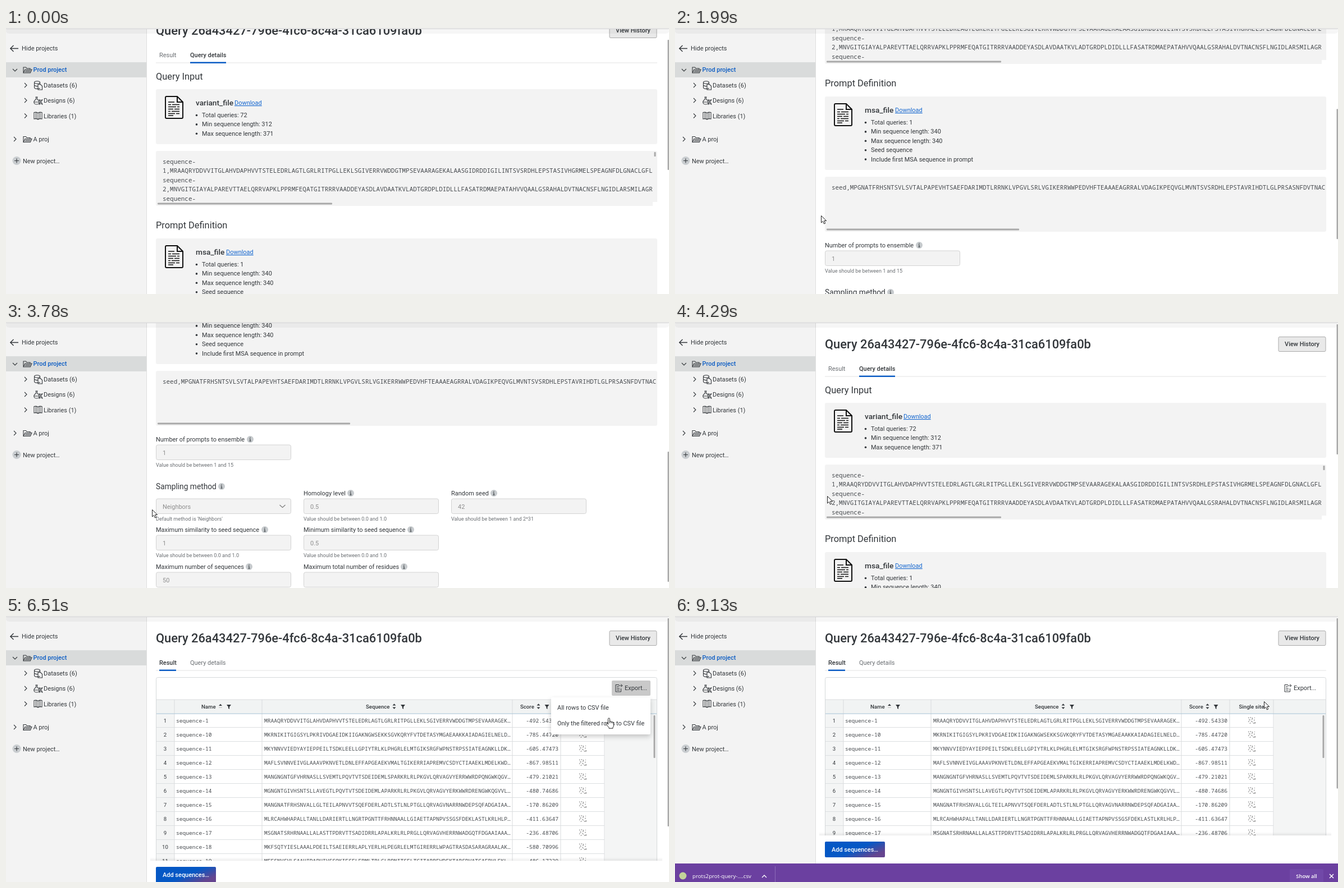
Write an HTML page that moves like this. It is 1181x474 px and loops after 9.15 s.

```html
<!DOCTYPE html>
<html lang="en">
<head>
<meta charset="utf-8">
<title>Query details</title>
<style>
  html, body { margin: 0; width: 100%; height: 100%; overflow: hidden; background: #fff; }
  svg { display: block; width: 100vw; height: 100vh; font: 10.94px Roboto, sans-serif; }
  text { fill: #33373b; white-space: pre; }
  .mono { font-family: "Noto Sans Mono", monospace; fill: #484c50; }
  .link { fill: #1567cf; text-decoration: underline; text-underline-offset: 2px; }
  .line { fill: none; stroke: #33373b; stroke-width: 1.1; }
</style>
</head>
<body>
<svg id="stage" viewBox="0 0 1181 474"></svg>
<script>
const LOOP = 9150;
const GREY = '#f3f3f3', THUMB = '#a9a9a9', BLUE = '#0b5cc4';

// ---- markup helpers ----
const text = (x, y, str, attrs = '') => `<text x="${x}" y="${y}" ${attrs}>${str}</text>`;
const bold = (size, extra = '') => `font-weight="500" font-size="${size}" ${extra}`;
const box = (x, y, w, h, fill, attrs = '') =>
  `<rect x="${x}" y="${y}" width="${w}" height="${h}" fill="${fill}" ${attrs}/>`;
const path = (d, attrs = 'class="line"') => `<path d="${d}" ${attrs}/>`;
const group = (id, body, attrs = '') => `<g id="${id}" ${attrs}>${body}</g>`;
const use = (id, x, y) => `<use href="#${id}" x="${x}" y="${y}"/>`;
const chevron = (x, y) => path(`M${x - 2} ${y - 4}l4 4l-4 4`);

const defs = `<defs>
  <linearGradient id="buttonFill" x2="1" y2=".6"><stop offset=".6" stop-color="#0558c5"/><stop offset="1" stop-color="#65458f"/></linearGradient>
  <linearGradient id="fade" x2="0" y2="1"><stop stop-color="#000" stop-opacity="0"/><stop offset="1" stop-color="#000" stop-opacity=".07"/></linearGradient>
  <filter id="shadow" x="-10%" y="-15%" width="120%" height="150%"><feDropShadow dx="0" dy="4" stdDeviation="4" flood-opacity=".2"/></filter>
  <clipPath id="variantClip">${box(267, 254, 885, 91, '#000')}</clipPath>
  <clipPath id="seedClip">${box(267, 553, 892, 98, '#000')}</clipPath>
  <g id="folder">${path('M0 11V1h4.5l1.5 2h6v2M0 11L3 5h12l-2.7 6ZM3.5 7h9.5M2.5 9h9.5')}</g>
  <g id="file" fill="none" stroke="#111" stroke-width="2">
    <path d="M1 3q0-2 2-2h19l10 10v27q0 2-2 2H3q-2 0-2-2ZM22 1v10h10"/>
    <path stroke-width="1.6" d="M6 11h11M6 15.500h5m2 0h13M6 19.500h14m2 0h4M6 23.500h9m2 0h9M6 27.500h4m2 0h14M6 31.500h12m2 0h6M6 35h9"/>
  </g>
  <g id="info"><circle r="6" fill="#c6cacd"/><path d="M0-1v4.200M-1.300-1H0M-1.500 3.200h3M0-3.700v1.400" stroke="#43484c" stroke-width="1.200"/></g>
  <g id="sort"><path d="M-3-1.500L0-4.800L3-1.500Z" fill="#33373b"/><path d="M-3 1.500L0 4.800L3 1.500Z" fill="#33373b"/></g>
  <g id="sortUp"><path d="M-3-1L0-4.300L3-1Z" fill="#33373b"/><path d="M-3 2h6" stroke="#bbb"/></g>
  <g id="funnel"><path d="M-4-3.500h8L1 .5v4L-1 3V.5Z" fill="#33373b"/></g>
  <g id="site"><path d="M-6-5l2 1m2-2l1 2m3-1l-1 2m4-2l1 1M-5-1l3 0m2 0l2-2m2 3l2-1M-6 3l2-2m1 5l1-2m2-2l2 1m1 3l1-2m2-1l1 2M-1 1l1 1M5 4l1 2" stroke="#666" stroke-width=".9" fill="none"/></g>
</defs>`;

// ---- sidebar ----
const treeRow = (y, label) => chevron(35, y) + text(67, y + 4, label);
const sidebar = box(0, 0, 250, 474, GREY) + box(250, 0, 1, 474, '#dedede') +
  box(0, 61, 250, 27, '#d9dbdb') +
  path('M22 36.500H8M13.500 31l-5.700 5.500l5.700 5.500', 'class="line" style="stroke-width:1.4"') +
  text(28, 40, 'Hide projects') +
  path('M12 73l4 4l4-4') + use('folder', 31, 69) +
  text(48.500, 78, 'Prod project', bold(10.94, `style="fill:${BLUE}"`)) +
  treeRow(102, 'Datasets (6)') +
  path('M50.500 97v9c0 3 9 3 10 1M50.500 97c0-3 10-3 10 0s-10 3-10 0m0 4.500c0 2 5 2.500 7 1.800M60.500 97v3M57 100.500h4.500l3 3v6.500h-7.500Z') +
  treeRow(129, 'Designs (6)') +
  path('M52.500 123h4M53.500 123v4c-6 4-4 9 1 9s7-5 1-9v-4M50.500 132h8M59 127c0 4 6 5 6 10M65 127c0 4-6 5-6 10M59.500 128.500h5M60 135h5') +
  treeRow(156.500, 'Libraries (1)') +
  path('M50 150.500q4-1 7 1q3-2 7-1v11.500q-4-1-7 1q-3-2-7-1ZM57 151.500v11M60.500 150.500v11M53.500 150.500v11') +
  chevron(16, 198) + use('folder', 31, 192.500) + text(48.500, 202, 'A proj') +
  '<circle cx="19" cy="236.500" r="7.500" fill="#c9cdd0"/>' + path('M15 236.500h8M19 232.500v8') +
  text(30, 240.500, 'New project…');

// ---- shared page head ----
const head = text(267, 47, 'Query 26a43427-796e-4fc6-8c4a-31ca6109fa0b', bold(21.88)) +
  box(1075, 26.500, 84, 26, '#e9e9e9', 'rx="2" stroke="#aaa"') +
  text(1117, 43, 'View History', bold(10.94, 'text-anchor="middle"')) +
  box(267, 96.500, 893, 1, '#e3e3e3');
const tabs = active => [['Result', 273, 30], ['Query details', 328, 64]].map(([name, x, w], i) =>
  text(x, 87, name, i === active ? bold(10.94) : 'style="fill:#6a6e72"') +
  (i === active ? box(x, 95.500, w, 2.500, BLUE) : '')).join('');

// ---- details view ----
const heading = (y, str) => text(267, y, str, 'font-size="16.4"');
const fileCard = (y, h, name, linkX, facts) =>
  box(267, y, 893, h, GREY, 'rx="3"') + use('file', 283, y + 12) +
  text(338, y + 28.500, name, bold(13.7)) + text(linkX, y + 28, 'Download', 'class="link"') +
  facts.map((fact, i) => `<circle cx="339.500" cy="${y + 46.500 + i * 16.4}" r="1.800" fill="#33373b"/>` +
    text(349, y + 50 + i * 16.4, fact)).join('');
const field = (x, y, label, infoX, value, help) =>
  text(x, y + 4, label) + use('info', infoX, y) +
  box(x + .5, y + 10, 240, 26.500, GREY, 'rx="3" stroke="#d3d3d3"') +
  text(x + 12, y + 27.500, value, 'style="fill:#8d8d8d"') +
  text(x, y + 48.500, help, 'font-size="9.1" style="fill:#6a6e72"');
const unit = 'Value should be between 0.0 and 1.0';
const variantLines = [
  'sequence-',
  '1,MRAAQRYDDVVITGLAHVDAPHVVTSTELEDRLAGTLGRLRITPGLLEKLSGIVERRVWDDGTMPSEVAARAGEKALAASGIDRDDIGILINTSVSRDHLEPSTASIVHGRMELSPEAGNFDLGNACLGFL',
  'sequence-',
  '2,MNVGITGIAYALPAREVTTAELQRRVAPKLPPRMFEQATGITRRRVAADDEYASDLAVDAATKVLADTGRDPLDIDLLLFASATRDMAEPATAHVVQAALGSRAHALDVTNACNSFLNGIDLARSMILAGR',
  'sequence-'];
const seed = 'seed,MPGNATFRHSNTSVLSVTALPAPEVHTSAEFDARIMDTLRRNKLVPGVLSRLVGIKERRWWPEDVHFTEAAAEAGRRALVDAGIKPEQVGLMVNTSVSRDHLEPSTAVRIHDTLGLPRSASNFDVTNACLG';

const details = head + tabs(1) +
  heading(127, 'Query Input') +
  fileCard(144, 98, 'variant_file', 407, ['Total queries: 72', 'Min sequence length: 312', 'Max sequence length: 371']) +
  box(267, 254, 893, 98, GREY, 'rx="3"') + box(1152, 345, 8, 7, '#fff') +
  `<g clip-path="url(#variantClip)">${variantLines.map((line, i) =>
    text(279, 277 + i * 16.4, line, 'class="mono"')).join('')}</g>` +
  box(270, 346.500, 311, 3, THUMB, 'rx="1"') + box(1154.500, 256, 3, 8, THUMB, 'rx="1"') +
  heading(392, 'Prompt Definition') +
  fileCard(410, 131, 'msa_file', 392, ['Total queries: 1', 'Min sequence length: 340', 'Max sequence length: 340',
    'Seed sequence', 'Include first MSA sequence in prompt']) +
  box(267, 553, 893, 98, GREY, 'rx="3"') +
  `<g clip-path="url(#seedClip)">${text(279, 576, seed, 'class="mono"')}</g>` +
  box(270, 645.500, 343, 3, THUMB, 'rx="1"') +
  field(267, 675, 'Number of prompts to ensemble', 435, '1', 'Value should be between 1 and 15') +
  text(267, 764, 'Sampling method', 'font-size="13.75"') + use('info', 384, 759) +
  field(267, 771, '', -99, 'Neighbors', "Default method is 'Neighbors'") + path('M487.500 792l5 4.500l5-4.500', 'class="line" style="stroke:#777"') +
  field(530, 771, 'Homology level', 614, '0.5', unit) +
  field(793, 771, 'Random seed', 869, '42', 'Value should be between 1 and 2^31') +
  field(267, 836, 'Maximum similarity to seed sequence', 461, '1', unit) +
  field(530, 836, 'Minimum similarity to seed sequence', 721, '0.5', unit) +
  field(267, 902, 'Maximum number of sequences', 433, '50', '') +
  field(530, 902, 'Maximum total number of residues', 709, '', '');

// ---- result view ----
const rows = [
  ['1', 'MRAAQRYDDVVITGLAHVDAPHVVTSTELEDRLAGTLGRLRITPGLLEKLSGIVERRVWDDGTMPSEVAARAGEK', '492.54330'],
  ['10', 'MKRNIKITGIGSYLPKRIVDGAEIDKIIGAKNGWSEKKSGVKQRYFVTDETASYMGAEAAKKAIADAGIELNELD', '785.44720'],
  ['11', 'MKYNNVVIEDYAYIEPPEILTSDKLEELLGPIYTRLKLPHGRLELMTGIKSRGFWPNSTRPSSIATEAGNKLLDK', '605.47473'],
  ['12', 'MAFLSVNNVEIVGLAAAVPKNVETLDNLEFFAPGEAEKVMALTGIKERRIAPREMVCSDYCTIAAEKLMDELKWD', '867.98511'],
  ['13', 'MANGNGNTGFVHRNASLLSVEMTLPQVTVTSDEIDEMLSPARKRLRLPKGVLQRVAGVYERRWWRDPQNGWKQGV', '479.21021'],
  ['14', 'MGNGNTGIVHSNTSLLAVEGTLPQVTVTSDEIDEMLAPARKRLRLPKGVLQRVAGVYERKWWRDRENGWKQGVVL', '480.74686'],
  ['15', 'MANGNATFRHSNVALLGLTEILAPNVVTSQEFDERLADTLSTLNLPTGLLQRVAGVNARRNWDEPSQFADGAIAA', '170.86209'],
  ['16', 'MLRCAHWHAPALLTANLLDARIERTLLNGRTPGNTTFRHNNAALLGIAETTAPNPVSSGSFDEKLASTLKRLHLP', '411.63647'],
  ['17', 'MSGNATSRHRNAALLALASTTPDRVTTSADIDRRLAPALKRLRLPRGLLQRVAGVHERRNWADGQTFDGAAIAAA', '236.48706'],
  ['18', 'MKFSQTYIESLAAALPDEILTSAEIERRLAPLYERLHLPEGRLELMTGIRERRLWPAGTRASDASARAGRAALAK', '580.70996'],
  ['19', 'MEFSNVSVLSAAHIDAPHIVSSQKIESELERMLTRLGLRPNITSELTGITARREWDEKTARSDVATGAERVLEKL', '486.17239']];
const cell = 'class="mono" font-size="9.63"';
const rowMarkup = ([n, sequence, score], i) => {
  const y = 189.500 + i * 25;
  return box(268, y + 8.500, 798, 1, '#dcdfe1') +
    text(283.500, y, i + 1, 'font-size="9.6" text-anchor="middle"') +
    text(303, y, 'sequence-' + n, cell) + text(460, y, sequence + '…', cell) +
    text(984, y, '-' + score, cell + ' text-anchor="end"') + use('site', 1027, y - 3.500);
};
const result = head + tabs(0) +
  box(268, 149, 32, 325, '#f4f5f5') + box(1067, 174, 92, 300, '#f4f5f5') + box(268, 149, 891, 25, '#f1f3f3') +
  box(268, 148.500, 891, 1, '#d9dcde') + rows.map(rowMarkup).join('') +
  [300, 456, 902, 988, 1066].map(x => box(x - .5, 149, 1, 325, '#d9dcde')).join('') +
  box(268, 173.500, 891, 1.200, '#b4cbdc') +
  text(348, 164.500, 'Name', bold(9.63)) + use('sortUp', 382, 161) + use('funnel', 397, 161.500) +
  text(641, 164.500, 'Sequence', bold(9.63)) + use('sort', 691.500, 161) + use('funnel', 707, 161.500) +
  text(916, 164.500, 'Score', bold(9.63)) + use('sort', 948.500, 161) + use('funnel', 963.500, 161.500) +
  text(1004.500, 164.500, 'Single site', bold(9.63)) +
  box(267.500, 109.500, 892, 400, 'none', 'rx="3" stroke="#d6d9db"') +
  box(1153.500, 177, 3, 76, THUMB, 'rx="1"') +
  box(1079, 115, 69, 27, '#c9c9c9', 'id="exportBack" rx="2"') +
  path('M1092 122.500h-6v12.500h9.500v-6M1088 126h3M1088 129h5M1088 132h5M1090.500 125.500q1-1.500 3-1.500h4M1095.500 121.500l2.500 2.500l-2.500 2.500', 'class="line" style="stroke-width:1"') +
  text(1102, 132, 'Export...') +
  group('footer', box(257, 430, 912, 6, 'url(#fade)') + box(251, 436, 927, 100, '#fff') +
    box(267, 447, 107, 28, 'url(#buttonFill)', 'rx="2"') +
    text(279, 465, 'Add sequences…', bold(10.94, 'style="fill:#fff"')));

const menu = box(971, 145, 177, 66, '#fff', 'rx="3" filter="url(#shadow)"') +
  text(982, 167, 'All rows to CSV file') + text(982, 195, 'Only the filtered rows to CSV file');

// ---- browser parts ----
const topEdge = box(0, 0, 1181, 10, '#000', 'fill-opacity=".035" rx="5"') +
  box(0, 0, 1181, 1, '#f4f4f4') + box(0, .8, 1181, 1.200, '#d4d4d4');
const ui = 'font-family="Open Sans, sans-serif" style="fill:#fff"';
const downloads = box(0, 441, 1181, 45, '#6b40a0') +
  '<circle cx="14" cy="463" r="6.500" fill="#c3d49a"/>' +
  text(31, 467, 'prots2prot-query-....csv', ui + ' font-size="9.7" font-weight="500"') +
  path('M155 466l4-4l4 4', 'fill="none" stroke="#fff" stroke-width="1.300"') +
  box(178, 446, 1, 40, '#8d6ab8') +
  box(1095, 451, 60, 24, '#7148a8', 'rx="2"') +
  text(1125, 466.500, 'Show all', ui + ' font-size="9.4" font-weight="600" text-anchor="middle"') +
  path('M1166 460l7 7m0-7l-7 7', 'stroke="#fff" stroke-width="1.500"');
const arrow = path('M.5.500v12.500l3-2.700l2 4.700l2.200-1l-2-4.500h4Z', 'fill="#fff" stroke="#222"');
const hand = path('M-1.500 9V1.500q0-1.500 1.500-1.500t1.500 1.500V6q2-1 2.800.5q1.800-.6 2.500.7q1.700-.3 1.700 1.500v4q0 2-1.500 4v1.500h-7v-1.500L-5 11q-1.500-2.500 0-2.800t3.500 3ZM1.500 6v3M4.300 6.500V9M6.800 7.200V9.500',
  'fill="#fff" stroke="#222"');

document.getElementById('stage').innerHTML = defs + box(0, 0, 1181, 474, '#fff') +
  group('details', details) + group('result', result) + sidebar + topEdge +
  box(1178.500, 0, 2.500, 0, THUMB, 'id="thumb" rx="1"') + group('menu', menu) +
  group('downloads', downloads) +
  group('cursor', group('arrow', arrow) + group('hand', hand));

// ---- motion: [time, ...values], linear in between ----
const scrollKeys = [[1270, 35], [1390, 40], [1990, 288], [2380, 478], [3660, 478], [3780, 466],
  [3900, 350], [4050, 165], [4170, 45], [4290, 0]];
const cursorKeys = [[430, 430, 462], [1240, 260, 334], [4050, 260, 334], [4290, 271, 310], [4830, 284, 160],
  [5100, 288, 82], [5370, 288, 82], [5640, 840, 50], [5790, 1100, 52], [5940, 1112, 85], [6090, 1114, 124],
  [6240, 1114, 124], [6510, 1074, 182], [6930, 1066, 170], [7170, 1064, 173], [8350, 1064, 173], [8720, 1049, 152]];
const barKeys = [[8720, 0], [9010, 45]];
const updates = [0, 430, 550, 700, 820, 970, 1090, 1240, 1390, 1540, 1690, 1840, 1990, 2110, 2230, 2380,
  3780, 3900, 4050, 4170, 4290, 4410, 4560, 4680, 4830, 4950, 5100, 5220, 5370, 5490, 5640, 5790,
  5940, 6090, 6240, 6390, 6510, 6630, 6780, 6930, 7050, 7170, 8350, 8470, 8590, 8720, 8860, 9010, 9130];

function valueAt(keys, t) {
  const next = keys.findIndex(key => key[0] > t);
  if (next === 0) return keys[0].slice(1);
  if (next < 0) return keys[keys.length - 1].slice(1);
  const a = keys[next - 1], b = keys[next], k = (t - a[0]) / (b[0] - a[0]);
  return a.slice(1).map((v, i) => v + (b[i + 1] - v) * k);
}
const part = id => document.getElementById(id);
const move = (id, x, y) => part(id).setAttribute('transform', `translate(${Math.round(x)} ${Math.round(y)})`);
const show = (id, on) => part(id).setAttribute('display', on ? 'inline' : 'none');

function draw(time) {
  const t = updates.findLast(moment => moment <= time);
  const [scroll] = valueAt(scrollKeys, t), [bar] = valueAt(barKeys, t);
  const onResult = t >= 5220;
  const pointing = (t >= 5100 && t < 5490) || (t >= 6090 && t < 8350);

  show('details', !onResult);
  show('result', onResult);
  move('details', 0, -scroll);
  move('footer', 0, -bar);
  move('downloads', 0, 45 - bar);
  show('downloads', bar > 0);
  show('exportBack', t >= 6090 && t < 8350);
  show('menu', t >= 6240 && t < 8350);
  part('thumb').setAttribute('y', onResult ? 4 : 4 + scroll * .487);
  part('thumb').setAttribute('height', onResult ? 371 - bar * 1.5 : 232);

  move('cursor', ...valueAt(cursorKeys, t));
  show('cursor', t >= 430);
  show('arrow', !pointing);
  show('hand', pointing);
}
const start = performance.now();
function tick() {
  draw((performance.now() - start) % LOOP);
  requestAnimationFrame(tick);
}
tick();
</script>
</body>
</html>
```
